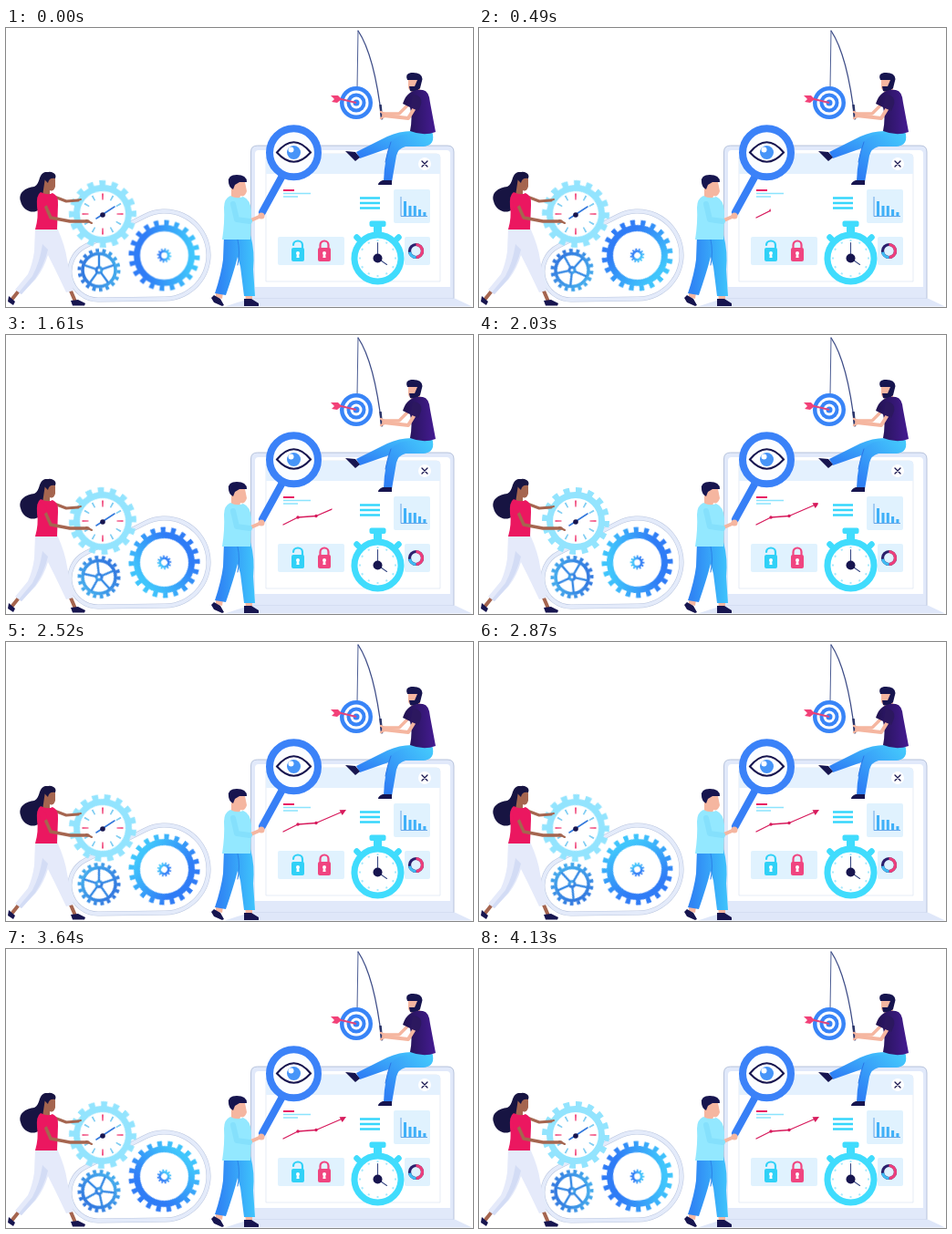
These frames come from a looping animation (512x306 px, 4.2 s). An HTML page without scripts:

```html
<!DOCTYPE html>
<html lang="en">
<head>
<meta charset="utf-8">
<title>Teamwork</title>
<style>
html, body { margin: 0; width: 100%; height: 100%; overflow: hidden; background: #fff; }
svg { display: block; width: 100vw; height: 100vh; }
.spin { animation: turn 4.2s steps(60) infinite; }
.back { animation-direction: reverse; }
.reveal { transform-origin: 303px 0; animation: grow 4.2s linear infinite; }
@keyframes turn { to { transform: rotate(360deg); } }
@keyframes grow { 0% { transform: scaleX(0); } 50%, 100% { transform: scaleX(1); } }
.line { fill: none; stroke-linecap: round; stroke-linejoin: round; }
.navy { fill: #17154f; }
.panel { fill: #e0f2fe; }
.skin { fill: #f5b6a0; }
.brown { fill: #a5654f; }
</style>
</head>
<body>
<svg viewBox="0 0 512 306" preserveAspectRatio="none">
<defs>
  <linearGradient id="gear">
    <stop offset=".15" stop-color="#2f7cf6"/><stop offset="1" stop-color="#40c6fc"/>
  </linearGradient>
  <linearGradient id="small">
    <stop offset="0" stop-color="#3279df"/><stop offset="1" stop-color="#43a9ec"/>
  </linearGradient>
  <linearGradient id="jeans">
    <stop offset=".1" stop-color="#2f84f4"/><stop offset="1" stop-color="#3fc4fc"/>
  </linearGradient>
  <linearGradient id="legs" x1="1" y1="0" x2="0" y2="1">
    <stop offset="0" stop-color="#46cffd"/><stop offset=".9" stop-color="#2f80f5"/>
  </linearGradient>
  <linearGradient id="shirt">
    <stop offset="0" stop-color="#20134f"/><stop offset="1" stop-color="#451b92"/>
  </linearGradient>
  <clipPath id="drawn"><rect class="reveal" x="303" y="178" width="71" height="36"/></clipPath>
  <g id="lock">
    <rect x="-7" y="0" width="14" height="15" rx="2"/>
    <circle cy="6" r="2" fill="#fff"/><path d="M-1 6h2l.6 5h-3.2z" fill="#fff"/>
  </g>
  <path id="belt" d="M87 239.300L152.300 206.200A48 48 0 1 1 174.700 297L101.400 298A31 31 0 0 1 87 239.300z"/>
</defs>

<!-- laptop -->
<path d="M268.500 297V136q0-7 7-7H484q7 0 7 7V297z" fill="#e1e9fa" stroke="#a9b6d4" stroke-width=".8"/>
<path d="M273 284V138q0-4 4-4H483q4 0 4 4V284z" fill="#fff"/>
<path d="M268 296.500H492L511 305.500H240z" fill="#dfe7f9"/>
<path d="M285 278V142q0-4 4-4H472q4 0 4 4V278z" fill="#fff" stroke="#dbe4f2" stroke-width=".7"/>
<path d="M285 160V142q0-4 4-4H472q4 0 4 4V160z" fill="#e4f1fe"/>
<circle cx="459" cy="149" r="7" fill="#fff"/>
<path class="line" d="M456 146l6 6m0-6l-6 6" stroke="#17154f" stroke-width="1.300"/>

<!-- dashboard -->
<path d="M304 178h12" stroke="#e81c64" stroke-width="2"/>
<path d="M304 181.500h30M304 185h16" stroke="#8be4fd" stroke-width="1.600"/>
<path d="M388 186.500h22m-22 5.500h22m-22 5.500h22" stroke="#36d6fc" stroke-width="2.700"/>
<g clip-path="url(#drawn)" fill="#d71a5c">
  <path class="line" d="M304 208L320 200 340 198.500 369 186" stroke="#d71a5c" stroke-width="1.300"/>
  <circle cx="320" cy="200" r="1.700"/><circle cx="340" cy="198.500" r="1.700"/>
  <path d="M373 184l-7.500.2 3.200 5.800z"/>
</g>
<g class="panel">
  <rect x="298" y="229" width="73" height="31" rx="2"/>
  <rect x="425" y="177" width="40" height="37" rx="2"/>
  <rect x="437" y="229" width="28" height="31" rx="2"/>
</g>
<path d="M433 185v21.500h29" fill="none" stroke="#5a9ee6" stroke-width=".9"/>
<path d="M437.500 206v-16m5.500 16v-11m5.300 11v-11m5.300 11v-7m5.300 7v-4" stroke="#3fb0f8" stroke-width="3"/>
<g transform="translate(320 241)" fill="#30d1f7">
  <path class="line" d="M5 1v-4a5 4.500 0 0 0-10 0" stroke="#30d1f7" stroke-width="2.200"/><use href="#lock"/>
</g>
<g transform="translate(349 241)" fill="#f04580">
  <path class="line" d="M4.500 1v-4a4.500 4.500 0 0 0-9 0v4" stroke="#f04580" stroke-width="2.200"/><use href="#lock"/>
</g>
<g transform="translate(449.500 244.500) rotate(-90)" fill="none" stroke="#2c206e" stroke-width="3.200">
  <circle r="7"/>
  <circle r="7" stroke="#ee3f7c" pathLength="100" stroke-dasharray="50 50"/>
  <circle r="7" stroke="#3fbdf5" pathLength="100" stroke-dasharray="22 78" stroke-dashoffset="-50"/>
</g>

<!-- stopwatch -->
<g transform="translate(407.500 252.500)" fill="#40dcfd">
  <rect x="-9" y="-41" width="18" height="6.500" rx="2"/><rect x="-4.500" y="-37" width="9" height="12"/>
  <path class="line" d="M-18-18l-5-5m41 5l5-5" stroke="#40dcfd" stroke-width="6.500"/>
  <circle r="25.500" fill="#fff" stroke="#40dcfd" stroke-width="7"/>
  <circle r="19.500" fill="none" stroke="#a9e9fc" stroke-width="2" pathLength="24" stroke-dasharray=".4 1.600" stroke-dashoffset=".2"/>
  <path class="line" d="M0 0V-17M0 0l10 7" stroke="#3a4a85" stroke-width="1.100"/>
  <circle r="5" class="navy"/>
</g>

<!-- belt and gears -->
<use href="#belt" fill="#fff" stroke="#b9c5df" stroke-width="5"/>
<use href="#belt" fill="none" stroke="#e4ebfa" stroke-width="4"/>
<g transform="translate(173.500 249.500)">
  <g class="spin" fill="none" stroke="url(#gear)">
    <circle r="36" stroke-width="6" pathLength="40" stroke-dasharray=".9 1.100"/>
    <circle r="30" stroke-width="7"/>
    <circle r="4.700" stroke-width="2.600"/>
    <circle r="6.700" stroke-width="2" pathLength="24" stroke-dasharray="1 1"/>
  </g>
</g>
<g transform="translate(102 265.500)">
  <g class="spin" fill="none" stroke="url(#small)">
    <circle r="21.500" stroke-width="4" pathLength="36" stroke-dasharray="1 1"/>
    <circle r="18" stroke-width="3.600"/>
    <circle r="3" stroke-width="3"/>
    <path d="M0-3V-17M2.900-.9L16.200-5.300M1.800 2.400L10 13.800M-1.800 2.400L-10 13.800M-2.900-.9L-16.200-5.300" stroke="#3689e4" stroke-width="2.400"/>
  </g>
</g>
<g transform="translate(106 204)">
  <g class="spin back" fill="none" stroke="#93e4fe">
    <circle r="34" stroke-width="6" pathLength="32" stroke-dasharray="1 1"/>
    <circle r="28.500" stroke-width="7" fill="#fff"/>
  </g>
  <g fill="none" stroke-width="6">
    <circle r="20" stroke="#7fcdf2" pathLength="120" stroke-dasharray="1.600 8.400" stroke-dashoffset=".8"/>
    <circle r="19.500" stroke="#fff" stroke-width="8" pathLength="120" stroke-dasharray="4 26" stroke-dashoffset="2"/>
    <circle r="19" stroke="#ee2c67" stroke-width="7" pathLength="120" stroke-dasharray="1.500 28.500" stroke-dashoffset=".75"/>
  </g>
  <path class="line" d="M-7 5L13-8" stroke="#3479dc" stroke-width="1.600"/>
  <circle cy="1" r="2.800" class="navy"/>
</g>

<!-- woman -->
<path d="M43 158C35 160 38 171 31 174C22 175 13 180 16 190C18 200 30 205 36 199C43 194 37 185 44 181L53 169Q56 157 43 158z" fill="#171442"/>
<path class="line" d="M53 185L66 190 79 189" stroke="#a5654f" stroke-width="3"/>
<path class="brown" d="M43 164Q52 160 54 166L54 174Q52 180 48 178L48 185 40 184z"/>
<path d="M41 165Q43 156 50 158Q56 160 54 165Q47 164 46 170z" fill="#171442"/>
<path class="line" d="M15 287L7 297M70 286L76 300" stroke="#a5654f" stroke-width="4"/>
<path d="M32 219H56Q65 239 67 254L74 288 66 290 54 265 46 249Q42 263 33 275L17 292 10 287 24 270Q29 259 31 245z" fill="#e5eafa"/>
<path d="M46 243Q42 260 32 275L17 292 14 290 29 272Q37 257 40 237z" fill="#d3dcf5"/>
<path d="M38 180Q46 184 51 181Q58 184 57 194L56 221H32Q36 207 34 196Q33 183 38 180z" fill="#eb1760"/>
<path class="line" d="M41 190L49 208 70 212 90 212" stroke="#a5654f" stroke-width="3.500"/>
<path class="line" d="M88 211l6 3m-16-25l4-1" stroke="#a5654f" stroke-width="2"/>
<path d="M36 184Q43 182 45 194L38 199z" fill="#eb1760"/>
<path class="navy" d="M3 294L10 300 8 304 2 300zM71 299L79 298 87 302 86 304.500H73z"/>

<!-- magnifier -->
<path class="line" d="M303 162L281 202" stroke="#377ff6" stroke-width="8"/>
<circle cx="315.500" cy="136.800" r="26.500" fill="#fbfdff" stroke="#3b82f8" stroke-width="8"/>
<path d="M297 136.500Q315.500 114 334 136.500Q315.500 157 297 136.500z" fill="#fff" stroke="#17154f" stroke-width="2"/>
<circle cx="315.500" cy="136.500" r="7.500" fill="#4795f8"/>
<circle cx="312.500" cy="133.500" r="3" fill="#fff"/>

<!-- standing man -->
<path class="skin" d="M230 288l8 2-1 7-7-2zM262 291h8v8h-7z"/>
<path d="M239 227H268Q273 245 271 265L273 294H261L257 262 254 251Q249 270 241 293L229 291Q236 270 238 254z" fill="url(#jeans)"/>
<path d="M254 232Q257 246 254 260" class="line" stroke="#2b82e9" stroke-width="1"/>
<path class="skin" d="M247 169H262L264 179Q262 186 257 184L256 188H247z"/>
<path class="navy" d="M244 169Q243 161 253 161Q264 161 264 169L256 169 251 172 249 177Q244 174 244 169z"/>
<path d="M246 184Q253 188 260 185Q268 188 269 201L268 232H237Q240 213 239 197Q239 187 246 184z" fill="#93e8ff"/>
<path class="line" d="M266 212L280 206" stroke="#f5b6a0" stroke-width="4"/>
<path class="line" d="M249 193L253 210 267 212" stroke="#85e0fc" stroke-width="6"/>
<circle class="skin" cx="280" cy="206" r="3.500"/>
<path class="navy" d="M228 293L235 297 239 304 237 305 228 301 225 296zM261 297H269L277 302V305H261z"/>

<!-- rod and dartboard -->
<path class="line" d="M386 3Q404 30 412 100" stroke="#3c4b86" stroke-width="1.300"/>
<path d="M410.500 84L412 100" stroke="#2a3468" stroke-width="2.500"/>
<path d="M386 3L385 66" stroke="#4c5d94" stroke-width="1"/>
<g transform="translate(384 82)">
  <circle r="18" fill="#3884f7"/><circle r="13.500" fill="#fff"/><circle r="10.500" fill="#3884f7"/>
  <circle r="6.500" fill="#fff"/><circle r="3.500" fill="#3884f7"/>
  <path d="M-21-5L0 0" stroke="#e0457c" stroke-width="2"/>
  <path d="M-28-8l8 0 4 4-5 4-6-1 3-3z" fill="#f24178"/>
</g>

<!-- seated man -->
<path d="M466 112Q472 128 457 130L425 130 388 143 384 136 418 119Q433 112 449 113z" fill="url(#legs)"/>
<path d="M467 113Q472 129 457 130H438Q430 132 428 140L423 169 414 168Q415 140 423 124Q431 115 448 116z" fill="url(#legs)"/>
<path class="line" d="M422 125Q418 136 416 147" stroke="#2b76e6" stroke-width="1"/>
<path class="navy" d="M372 135L383 136 388 142 383 146zM413 167H423V172H408Q408 169 413 167z"/>
<path class="skin" d="M441 55H454V74L447 73 441 66z"/>
<path class="navy" d="M440 57Q437 50 444 49Q456 48 456.500 56L454 66Q449 71 443 69L442 64 448 64 451 57z"/>
<path class="line" d="M441 84L431 94 414 94" stroke="#f5b6a0" stroke-width="3.300"/>
<path d="M443 71Q449 67 457 68Q464 69 465 82L471 114Q458 119 443 113Q446 98 443 87L435 83Q438 74 443 71z" fill="url(#shirt)"/>
<path class="line" d="M449 86L441 99 414 96" stroke="#f5b6a0" stroke-width="4"/>
<path d="M446 73Q457 74 455 84L452 91 443 87z" fill="#2c185f"/>
<path class="line" d="M417 95l-6-3m6 4l-6 3" stroke="#f5b6a0" stroke-width="2.400"/>
</svg>
</body>
</html>
```
